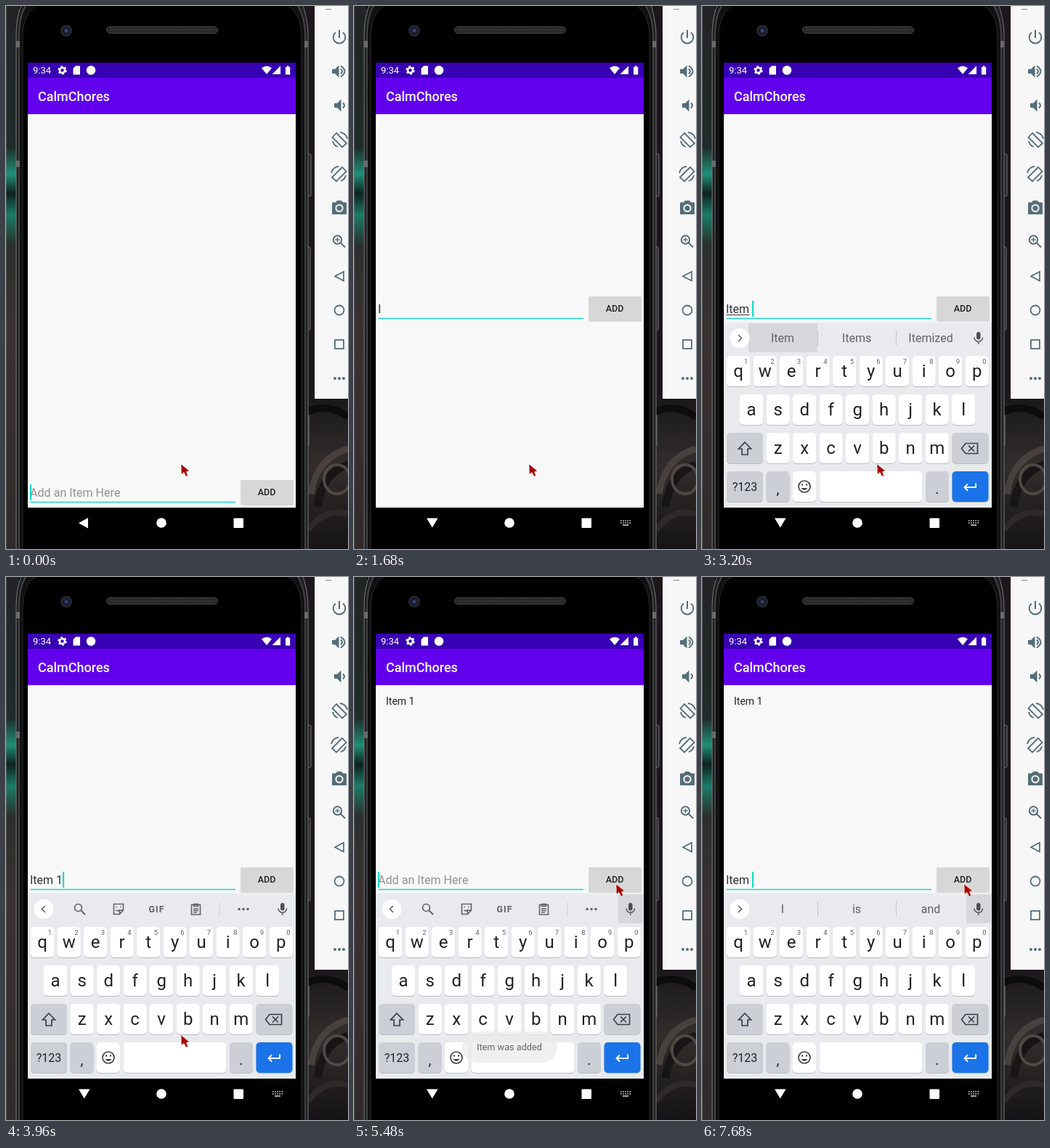
An HTML page that plays this animation: 471x748 px, repeating every 8000 ms.

```html
<!DOCTYPE html>
<html lang="en">
<head>
<meta charset="utf-8">
<title>To-do demo</title>
<style>
html, body { margin: 0; width: 100%; height: 100%; overflow: hidden; background: #000; }
svg { display: block; width: 100%; height: 100%; }
text { font-family: Roboto, "Liberation Sans", sans-serif; white-space: pre; }
.mid { text-anchor: middle; }
.side { fill: none; stroke: #546e7a; stroke-width: 2; }
.tool { fill: none; stroke: #5f6368; stroke-width: 1.6; }
</style>
</head>
<body>
<svg viewBox="0 0 471 748" xmlns="http://www.w3.org/2000/svg">
  <defs>
    <linearGradient id="wall" x2="0" y2="1">
      <stop offset="0" stop-color="#222425"/><stop offset=".26" stop-color="#1f2c29"/>
      <stop offset=".31" stop-color="#1f8f78"/><stop offset=".345" stop-color="#0e211d"/>
      <stop offset=".385" stop-color="#1b7c69"/><stop offset=".44" stop-color="#2b302d"/>
      <stop offset=".6" stop-color="#3a3230"/><stop offset="1" stop-color="#302b2b"/>
    </linearGradient>
    <linearGradient id="metal" x2="0" y2="1">
      <stop offset="0" stop-color="#1a181b"/><stop offset=".45" stop-color="#332e2c"/><stop offset="1" stop-color="#151315"/>
    </linearGradient>
    <radialGradient id="lens"><stop offset="0" stop-color="#4a5a96"/><stop offset=".45" stop-color="#14182c"/><stop offset="1" stop-color="#2c2c2e"/></radialGradient>
  </defs>

  <!-- desktop -->
  <rect width="18" height="748" fill="url(#wall)"/>
  <rect width="1" height="748" fill="#777" opacity=".5"/>
  <rect x="408" width="63" height="748" fill="#1d171b"/>
  <rect x="412" y="541" width="59" height="207" fill="url(#metal)"/>
  <g fill="none">
    <path d="M414 560Q440 545 471 566" stroke="#0d0c0d" stroke-width="10"/>
    <path d="M420 672Q428 622 471 610" stroke="#48413d" stroke-width="9"/>
    <path d="M429 690Q436 642 471 632" stroke="#181517" stroke-width="11"/>
    <ellipse cx="456" cy="652" rx="18" ry="20" stroke="#504843" stroke-width="4"/>
    <path d="M416 722Q440 690 471 700" stroke="#2f2a29" stroke-width="8"/>
  </g>
  <g fill="#252426" stroke="#77787a" stroke-width="1">
    <rect x="413" y="204" width="7" height="58" rx="1.5"/>
    <rect x="413" y="332" width="6" height="114" rx="1.5"/>
    <rect x="413" y="564" width="4" height="41"/>
  </g>

  <!-- phone -->
  <path d="M21-2C16 14 14 24 14 44V750H416V44C416 24 413 14 409-2Z" fill="#202122" stroke="#77787a"/>
  <path d="M28-2C20 12 18 24 18 46V750H412V46C412 24 409 12 401-2Z" fill="#111" stroke="#4c4d4f" stroke-width="1.5"/>
  <path d="M43-2C28 9 23 22 23 46V750H407V46C407 22 402 9 387-2Z" fill="#000" stroke="#2a2a2b"/>
  <path d="M14 48h5v9h-5zM14 213h5v9h-5zM411 48h5v9h-5z" fill="#696a6c"/>
  <rect x="138.5" y="28.500" width="153" height="9" rx="4.500" fill="#262626" stroke="#444"/>
  <path d="M143 33H288" stroke="#363636" stroke-width="3" stroke-dasharray="2 1"/>
  <circle cx="83" cy="34" r="8" fill="url(#lens)"/>

  <!-- app -->
  <rect x="30" y="78" width="369" height="613" fill="#f8f8f8"/>
  <rect x="30" y="78" width="369" height="21" fill="#3700b3"/>
  <rect x="30" y="99" width="369" height="50" fill="#6200ee"/>
  <g fill="#fff">
    <text x="37" y="93" font-size="13">9:34</text>
    <circle cx="77.500" cy="88.500" r="3.500" fill="none" stroke="#fff" stroke-width="2.600"/>
    <circle cx="77.500" cy="88.500" r="5.300" fill="none" stroke="#fff" stroke-width="1.800" stroke-dasharray="2.800 2.750"/>
    <path d="M96 82.500H102V94.500H92.500V86Z"/>
    <circle cx="117" cy="88.500" r="6.300"/>
    <path d="M352 85.500Q359 80 366 85.500L359 94ZM378 82.500V94H366.500ZM385 84h1.800v-1.500h2.600V84h1.800v10.500h-6.200z"/>
    <text x="44" y="131" font-size="18" font-weight="500">CalmChores</text>
  </g>
  <text id="item" x="44" y="176" font-size="14" fill="#222">Item 1</text>
  <g id="entry">
    <path d="M33.500 430.500H316" stroke="#19d6cb" stroke-width="1.500"/>
    <text id="field" x="33" y="423.300"></text>
    <path id="under" stroke="#333" stroke-width="1"/>
    <rect id="caret" y="406" width="2" height="22" fill="#03dac5"/>
    <rect x="323" y="401" width="73" height="34" rx="2" fill="#000" opacity=".13"/>
    <rect id="button" x="323" y="400" width="73" height="33" rx="2"/>
    <text x="359" y="420.500" class="mid" font-size="12.500" font-weight="500" fill="#222">ADD</text>
  </g>

  <g id="board">
    <rect x="30" y="435" width="369" height="2" fill="#eff0f1"/>
    <rect x="30" y="437" width="369" height="254" fill="#e8eaed"/>
    <rect id="hover" x="364" y="437" width="34" height="40" fill="#d5d7da"/>
    <rect id="pick" x="64" y="437" width="95" height="40" fill="#d5d7da"/>
    <circle cx="52" cy="457.500" r="13.500" fill="#fff"/>
    <path id="chevron" class="tool"/>
    <g id="tools" class="tool">
      <circle cx="99.500" cy="455.500" r="5"/><path d="M103.500 459.500L109 465" stroke-width="2"/>
      <path d="M148.500 450.500H161.500V459L156.500 464.500H148.500ZM161 459H156.500V464M151.500 458.500Q154 461.500 156 458.500M151.500 454.500h1.500M157 454.500h1.500"/>
      <path d="M255.500 451.500H267.500V465H255.500ZM258.500 450.500H264.500V453.500H258.500ZM258 457H265M258 459.500H265M258 462H263"/>
      <path d="M294 448V467" stroke="#cfd1d5" stroke-width="1"/>
      <path d="M321 457.500h.01M327 457.500h.01M333 457.500h.01" stroke-width="3.600" stroke-linecap="round"/>
      <text x="207.500" y="461.500" class="mid" font-size="12.500" font-weight="700" letter-spacing="1" fill="#5f6368" stroke="none">GIF</text>
    </g>
    <g id="words" class="mid" font-size="16" fill="#5f6368">
      <path d="M159.500 447V468M267.500 447V468" stroke="#c3c6ca"/>
      <text x="111" y="463"></text><text x="213" y="463"></text><text x="315" y="463"></text>
    </g>
    <rect x="378" y="449" width="5.500" height="10.500" rx="2.700" fill="#4b4f54"/>
    <path d="M375 456.500a5.700 5.700 0 0 0 11.500 0M380.700 462.500V466" class="tool"/>
    <g id="keys"></g>
    <g fill="none" stroke="#3c4043" stroke-width="1.700">
      <path d="M59 601L67.500 610H63V618H55V610H50.500Z"/>
      <path d="M363 602.500H379.500V616.500H363L357.500 609.500ZM367 605.500L375 613.500M375 605.500L367 613.500"/>
      <circle cx="141" cy="662" r="8"/>
      <path d="M136.500 664Q141 670 145.500 664Z" fill="#3c4043" stroke="none"/>
      <path d="M138 659.500h.01M144 659.500h.01" stroke-width="2.400" stroke-linecap="round"/>
      <path d="M377 657.500V663H362M366 658.500L361.500 663L366 667.500" stroke="#fff" stroke-width="2"/>
    </g>
  </g>

  <g id="toast">
    <rect x="149" y="626" width="131" height="43" rx="21.500" fill="#ebebeb"/>
    <text x="169" y="652" font-size="12.700" fill="#333">Item was added</text>
  </g>

  <!-- navigation bar -->
  <g fill="#fff">
    <path id="back"/>
    <circle cx="214" cy="712" r="6.800"/>
    <rect x="313.500" y="705.500" width="13.500" height="13.500" rx="1"/>
    <g id="ime" fill="none" stroke="#ddd" stroke-width="1.500">
      <path d="M367 709H381M367 712H381" stroke-dasharray="1.600 1.500"/><path d="M370 715H378"/>
    </g>
  </g>

  <!-- emulator panel -->
  <rect x="425" y="-2" width="48" height="543" fill="#f7f7f7"/>
  <path d="M440 4.500H448" stroke="#888"/>
  <g class="side">
    <path d="M459 33V44M454 36.500A8.300 8.300 0 1 0 464 36.500"/>
    <path d="M449 87H453L458.500 81.500V98.500L453 93H449Z" fill="#546e7a" stroke="none"/>
    <path d="M461 86.500Q465 90 461 93.500M461 82.500Q472 90 461 97.500"/>
    <path d="M452 134H456L461.500 128.500V145.500L456 140H452Z" fill="#546e7a" stroke="none"/>
    <path d="M464 133.500Q468 137 464 140.500"/>
    <g id="turn"><path d="M455 175L469 189L463 194.500L449.500 181ZM460 174Q468 175 470 183M450 186Q451 192 457 194" stroke-width="1.800"/></g>
    <use href="#turn" transform="matrix(-1 0 0 1 918 47)"/>
    <path d="M449.500 271H454L456 268.500H462L464 271H468.500V286.500H449.500Z" fill="#546e7a" stroke-linejoin="round" stroke-width="1"/>
    <circle cx="459" cy="278.500" r="4.600" fill="#546e7a" stroke="#f7f7f7"/>
    <circle cx="456.500" cy="322" r="5.700"/><path d="M460.500 326L467 332.500"/><path d="M453.500 322H459.500M456.500 319V325" stroke-width="1.400"/>
    <path d="M465 366V378.500L453 372.200Z" stroke-width="1.700"/>
    <circle cx="459" cy="419" r="6.500" stroke-width="1.800"/>
    <rect x="453" y="460" width="12" height="12" stroke-width="1.800"/>
    <path d="M453 513h.01M459 513h.01M465 513h.01" stroke-width="4" stroke-linecap="round"/>
  </g>

  <path id="mouse" d="M0 0L.5 14L4 11.500L7 17L9.500 16L7.500 10.500L11.500 9.500Z" fill="#a80000" stroke="#fff" stroke-width=".5"/>
</svg>
<script>
const $ = id => document.getElementById(id);
const LOOP = 8000, HINT = 'Add an Item Here';
const advance = { I: 4.4, t: 5.2, e: 8.5, m: 14, ' ': 4, 1: 9 };
const width = s => [...s].reduce((sum, c) => sum + advance[c], 0);

function key(x, y, w, label = '', fill = '#fff', size = 24, drop = 29) {
  return `<rect x="${x}" y="${y + 1}" width="${w}" height="42" rx="5" fill="#b9bcc2"/>
    <rect x="${x}" y="${y}" width="${w}" height="42" rx="5" fill="${fill}"/>
    <text x="${x + w / 2}" y="${y + drop}" class="mid" font-size="${size}" fill="#202124">${label}</text>`;
}
const row = (letters, x, y) => [...letters].map((c, i) => key(x + 36.5 * i, y, 32.3, c)).join('');
const digits = [...'1234567890'].map((d, i) =>
  `<text x="${60.5 + 36.5 * i}" y="493" class="mid" font-size="9.5" fill="#5f6368">${d}</text>`).join('');
const grey = '#cccfd5';
$('keys').innerHTML = row('qwertyuiop', 34, 482) + digits + row('asdfghjkl', 52, 535) +
  row('zxcvbnm', 88.5, 588) + key(34, 588, 50, '', grey) + key(344.5, 588, 50, '', grey) +
  key(34, 641, 50, '?123', grey, 16, 27) + key(88.5, 641, 32, ',', grey, 20, 31) + key(125, 641, 32) +
  key(161.5, 641, 142) + key(308, 641, 32, '.', grey, 20, 31) + key(344.5, 641, 50, '', '#1a73e8');

// Each step overrides part of the state: u = underlined letters, toast = opacity
const next = ['I', 'is', 'and'], forms = ['Item', 'Items', 'Itemized'];
const steps = [
  [0, { text: '', caret: 1, u: 0, words: null, pick: 0, up: 0, board: 0, ime: 0, hover: 0, press: 0, item: 0, toast: 0, mouse: [241, 631] }],
  [250, { caret: 0 }],
  [370, { caret: 1, ime: 1 }],
  [860, { caret: 0 }],
  [1000, { text: 'I', caret: 1 }],
  [1420, { up: 1 }],
  [1680, { caret: 0 }],
  [1940, { board: 1 }],
  [2200, { text: 'Ite', caret: 1, u: 2 }],
  [2580, { u: 3, words: ['Ite', 'Item', 'Items'] }],
  [2720, { text: 'Item' }],
  [2840, { words: forms }],
  [2960, { u: 4 }],
  [3080, { text: 'Item ' }],
  [3200, { pick: 1 }],
  [3450, { u: 0, pick: 0, words: next }],
  [3840, { text: 'Item 1' }],
  [3960, { words: null }],
  [4240, { mouse: [251, 526] }],
  [4380, { caret: 0, mouse: [303, 472] }],
  [4500, { mouse: [344, 438] }],
  [4620, { mouse: [361, 423], hover: 1 }],
  [4740, { caret: 1 }],
  [4990, { caret: 0, press: 1 }],
  [5240, { text: '', press: 0, item: 1 }],
  [5360, { toast: .4 }],
  [5480, { toast: .75, caret: 1 }],
  [5620, { toast: .9 }],
  [5740, { toast: 1 }],
  [5980, { caret: 0 }],
  [6510, { text: 'I', caret: 1 }],
  [6790, { text: 'It', u: 1 }],
  [6910, { u: 2, words: ['It', 'Item', 'It’s'] }],
  [7170, { text: 'Ite', u: 3, toast: .6 }],
  [7290, { text: 'Item', words: forms, toast: .25 }],
  [7410, { u: 4, toast: 0 }],
  [7530, { text: 'Item ', pick: 1 }],
  [7680, { u: 0, pick: 0, words: next }]
];

const set = (id, name, value) => $(id).setAttribute(name, value);
const show = (id, amount) => set(id, 'opacity', +amount);
const labels = $('words').querySelectorAll('text');

function draw(s) {
  $('field').textContent = s.text || HINT;
  set('field', 'fill', s.text ? '#333' : '#929292');
  set('field', 'font-size', s.text ? 16 : 16.1);
  set('entry', 'transform', `translate(0 ${s.up ? 0 : 253})`);
  set('caret', 'x', 33 + width(s.text));
  set('under', 'd', `M33.500 425.500h${width(s.text.slice(0, s.u))}`);
  set('button', 'fill', s.press ? '#bfc0c0' : '#d6d7d7');
  set('back', 'd', s.ime ? 'M100 705.500H115.500L107.800 718.500Z' : 'M113 705V719.500L100 712.200Z');
  set('chevron', 'd', s.words ? 'M50 453L54.500 457.500L50 462' : 'M54 453L49.500 457.500L54 462');
  set('mouse', 'transform', `translate(${s.mouse})`);
  labels.forEach((label, i) => label.textContent = s.words ? s.words[i] : '');
  show('words', !!s.words);
  show('tools', !s.words);
  show('under', s.u > 0);
  for (const id of ['caret', 'pick', 'board', 'ime', 'hover', 'item', 'toast']) show(id, s[id]);
}

let last = -1;
function tick() {
  const t = performance.now() % LOOP;
  const index = steps.filter(([at]) => at <= t).length;
  if (index !== last) {
    draw(Object.assign({}, ...steps.slice(0, index).map(step => step[1])));
    last = index;
  }
  requestAnimationFrame(tick);
}
tick();
</script>
</body>
</html>
```
